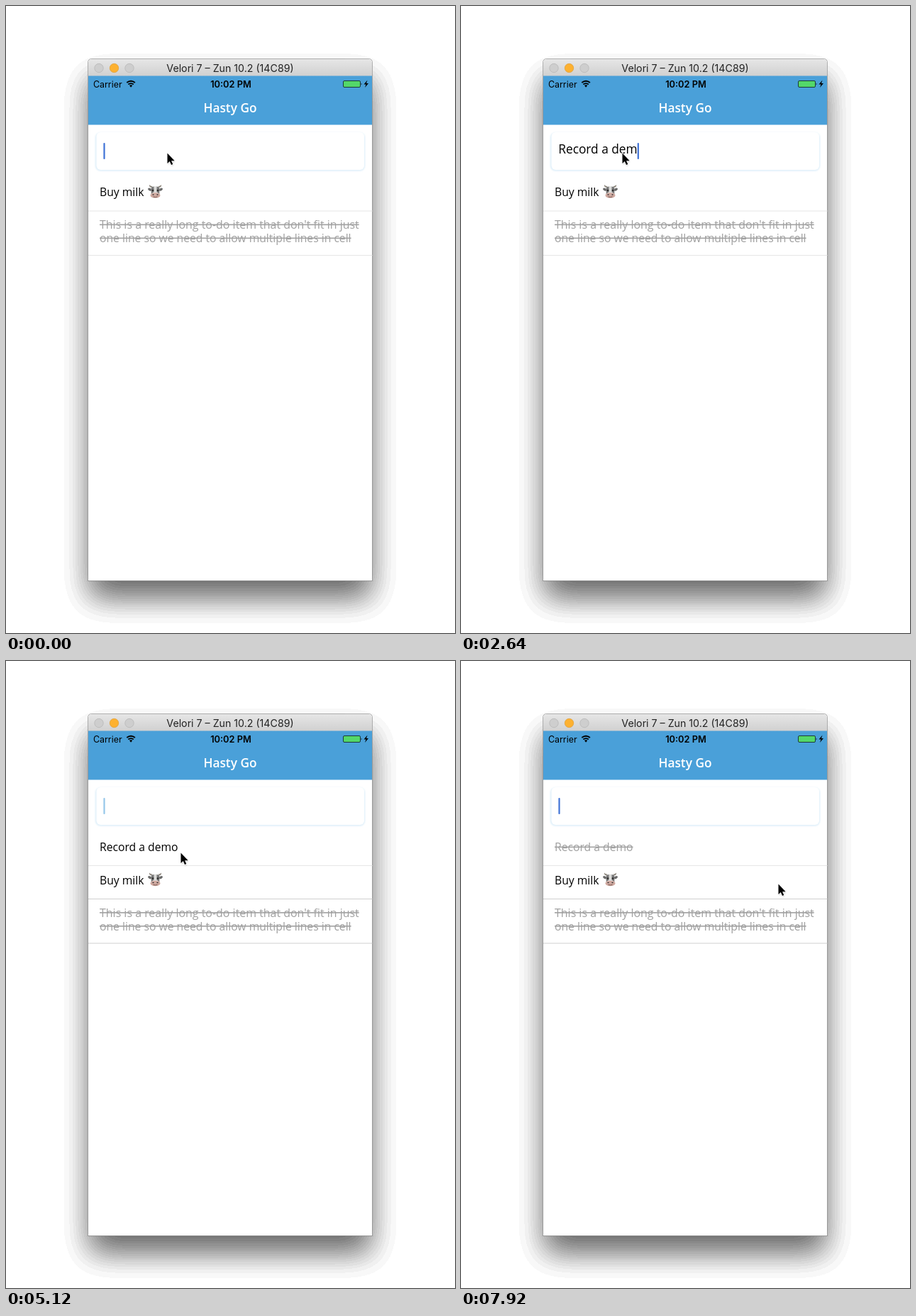
Animation, 633 px wide and 884 px high, one loop 8000 ms. Source, as an HTML page:

```html
<!DOCTYPE html>
<html lang="en">
<head>
<meta charset="utf-8">
<title>To-do demo</title>
<style>
  html, body { margin: 0; width: 100%; height: 100%; overflow: hidden; background: #fff; }
  svg { display: block; width: 100vw; height: 100vh; }
  text { font-family: "Open Sans", "Noto Sans", sans-serif; font-size: 15.7px; white-space: pre; }
  .system { font-family: Inter, Roboto, sans-serif; font-size: 12.4px; }
  .done { fill: #a0a0a0; text-decoration: line-through; }
</style>
</head>
<body>
<svg viewBox="0 0 633 884">
  <defs>
    <filter id="banded" filterUnits="userSpaceOnUse" x="0" y="0" width="633" height="884">
      <feGaussianBlur stdDeviation="22"/>
      <feComponentTransfer><feFuncA id="bands" type="discrete"/></feComponentTransfer>
    </filter>
    <filter id="soft" x="-10%" y="-20%" width="120%" height="140%"><feGaussianBlur stdDeviation="1"/></filter>
    <linearGradient id="chrome" x2="0" y2="1">
      <stop stop-color="#e6e6e6"/><stop offset="1" stop-color="#d0d0d0"/>
    </linearGradient>
    <clipPath id="screen"><rect x="116" y="168" width="400.5" height="642"/></clipPath>
  </defs>

  <rect x="116" y="101" width="400" height="735" filter="url(#banded)"/>
  <path d="M115.5 810.5V80q0-5.500 5.500-5.500h390q5.500 0 5.500 5.500v730.500z" fill="#fff" stroke="#000" stroke-opacity=".3"/>

  <!-- Window title bar -->
  <path d="M116 99V80q0-5 5-5h390q5 0 5 5v19z" fill="url(#chrome)"/>
  <g fill="#cecece" stroke="#b8b8b8" stroke-width=".8">
    <circle cx="131" cy="87.5" r="6.2"/>
    <circle cx="152.5" cy="87.5" r="6.2" fill="#fdb130" stroke="#e0a03a"/>
    <circle cx="174" cy="87.5" r="6.2"/>
  </g>
  <text class="system" x="316" y="92.5" text-anchor="middle" fill="#222" style="font-size:14.2px">Velori 7 – Zun 10.2 (14C89)</text>

  <!-- Status and navigation bars -->
  <rect x="116" y="98.500" width="400" height="69" fill="#4aa0d9"/>
  <text class="system" x="123" y="114.5">Carrier</text>
  <g fill="none" stroke="#000" stroke-width="1.9">
    <path d="M170.3 108q5.8-4.6 11.6 0M172.4 110.5q3.7-2.8 7.4 0"/>
    <path d="M174 112l2.1 2.8 2.1-2.8q-2.1-1.3-4.2 0z" fill="#000" stroke="none"/>
  </g>
  <text class="system" x="317" y="114.5" text-anchor="middle" font-weight="600" style="font-size:12.8px">10:02 PM</text>
  <rect x="475.5" y="105.5" width="24" height="9" rx="1.5" fill="#53d769" stroke="#1c3a3a"/>
  <path d="M500.7 108.500q1.800 1.500 0 3z"/>
  <path d="M509.5 104.5l-5 6h3l-1.5 4.5 5-6h-3z"/>
  <text x="316" y="150" text-anchor="middle" fill="#fff" font-weight="600" style="font-size:17.3px">Hasty Go</text>

  <!-- Task list -->
  <g clip-path="url(#screen)">
    <g id="newRow">
      <text id="newText" x="132" y="268">Record a demo</text>
      <path id="newLine" d="M116 288.5h401"/>
    </g>
    <g id="oldRows">
      <text x="132" y="268">Buy milk</text>
      <g transform="translate(210.5 262)">
        <path d="M-5-6q-4 0-3.500-4 2 2.500 4.500 2zM5-6q4 0 3.500-4-2 2.500-4.500 2z" fill="#8f897f"/>
        <path d="M-5-4q-5-3-5.500 0 1 3 5 3zM5-4q5-3 5.500 0-1 3-5 3z" fill="#6a6a6a"/>
        <path d="M-5.500-6.500Q0-9 5.500-6.500L6 4H-6z" fill="#dcdcda"/>
        <path d="M-5.500-6.500L-2-7.500-2 0-5.800 3zM5.500-6.500L2-7.500 2 0 5.800 3z" fill="#777"/>
        <ellipse cy="5" rx="7" ry="3.800" fill="#cfa9a0"/>
        <g fill="#2a2a2a">
          <circle cx="-3.500" cy="-2" r="1.300"/><circle cx="3.500" cy="-2" r="1.300"/>
          <ellipse cx="-3" cy="4" rx="1.200" ry=".8"/><ellipse cx="3" cy="4" rx="1.200" ry=".8"/>
        </g>
        <path d="M-3 7q3 1 6 0" fill="none" stroke="#76554f"/>
      </g>
      <text class="done" x="132" y="314" style="font-size:15.95px">This is a really long to-do item that don't fit in just</text>
      <text class="done" x="132" y="333">one line so we need to allow multiple lines in cell</text>
      <path id="oldLines" d="M116 289h401M116 351.5h401"/>
    </g>
  </g>

  <!-- Input field -->
  <rect x="126" y="178.5" width="380" height="54" rx="7" fill="#dceef9" filter="url(#soft)"/>
  <rect x="127.500" y="178" width="377.500" height="53" rx="6" fill="#fff"/>
  <text id="typed" x="137.3" y="208" style="font-size:17.3px"></text>
  <rect id="caret" y="193" width="2.2" height="23" rx="1"/>

  <g id="pointer">
    <path d="M0 0V14.5l3.3-3 2.2 5 2.3-1-2.2-4.8h4.6z" transform="translate(.5 1.5)" opacity=".25" filter="url(#soft)"/>
    <path d="M0 0V14.5l3.3-3 2.2 5 2.3-1-2.2-4.8h4.6z" stroke="#fff" stroke-width="1.6" paint-order="stroke"/>
  </g>
</svg>

<script>
const LOOP = 8000, STEP = 80;
const TASK = "Record a demo";
const ROW_HEIGHT = 46.5;
const SUBMIT = 3440, INSERT = 3540, RELEASE = 5900;
const TYPING = Array.from(TASK, (_, i) => i < 7 ? 500 + i * 170 : 1920 + (i - 7) * 150);
const POINTER = [
  [0, 227.5, 207.5], [4300, 227.5, 207.5], [4900, 246.5, 270.5], [5250, 246.5, 270.5],
  [RELEASE, 319.5, 270.5], [6760, 319.5, 270.5], [7600, 447.5, 314.5], [LOOP, 447.5, 314.5]
];
const SWIPE_FROM = 246.5, SWIPE_TO = 319.5;

const byId = id => document.getElementById(id);
const clamp = v => Math.min(1, Math.max(0, v));
const ease = v => v * v * (3 - 2 * v);
const span = (t, start, end) => ease(clamp((t - start) / (end - start)));
const move = (id, x, y) => byId(id).setAttribute("transform", `translate(${x} ${y})`);

byId("bands").setAttribute("tableValues", Array.from({ length: 20 }, (_, i) => i * 0.031).join(" "));

function pointerAt(t) {
  const i = POINTER.findIndex(([time]) => time > t);
  const [t0, x0, y0] = POINTER[i - 1], [t1, x1, y1] = POINTER[i];
  const p = span(t, t0, t1);
  return [x0 + (x1 - x0) * p, y0 + (y1 - y0) * p];
}

// One blink per second: solid, fade out, hidden, fade in.
function caretOpacity(t) {
  if (t >= TYPING[0] && t < 3100 || t >= SUBMIT && t < INSERT) return 1;
  const phase = (t + 540) % 1000 / 1000;
  return phase < 0.2 ? clamp((phase + 0.02) / 0.14) : clamp((0.76 - phase) / 0.17);
}

function draw(t) {
  const typed = byId("typed"), caret = byId("caret");
  typed.textContent = TASK.slice(0, TYPING.filter(time => time <= t).length);
  const opacity = caretOpacity(t);
  caret.setAttribute("x", 137.4 + (t < INSERT ? typed.getComputedTextLength() : 0));
  caret.setAttribute("opacity", opacity);
  caret.setAttribute("fill", opacity < 1 ? "#4aa0d9" : "#3f72d6");
  if (t >= SUBMIT) typed.textContent = "";

  const inserted = span(t, INSERT, 3840);
  move("oldRows", 0, ROW_HEIGHT * inserted);
  byId("newRow").setAttribute("opacity", inserted);
  byId("newLine").setAttribute("stroke", t < 4160 ? "#b8b8b8" : "#e6e6e6");
  byId("oldLines").setAttribute("stroke", t < 4160 ? "#e6e6e6" : "#d0d0d0");

  const [x, y] = pointerAt(t);
  move("pointer", x, y);
  const swipe = t < RELEASE ? x - SWIPE_FROM : (SWIPE_TO - SWIPE_FROM) * (1 - span(t, RELEASE, 6220));
  move("newRow", t < 5250 ? 0 : swipe, 0);
  byId("newText").setAttribute("class", t >= RELEASE ? "done" : "");
}

function frame(now) {
  draw(Math.floor(now % LOOP / STEP) * STEP);
  requestAnimationFrame(frame);
}
requestAnimationFrame(frame);
</script>
</body>
</html>
```
